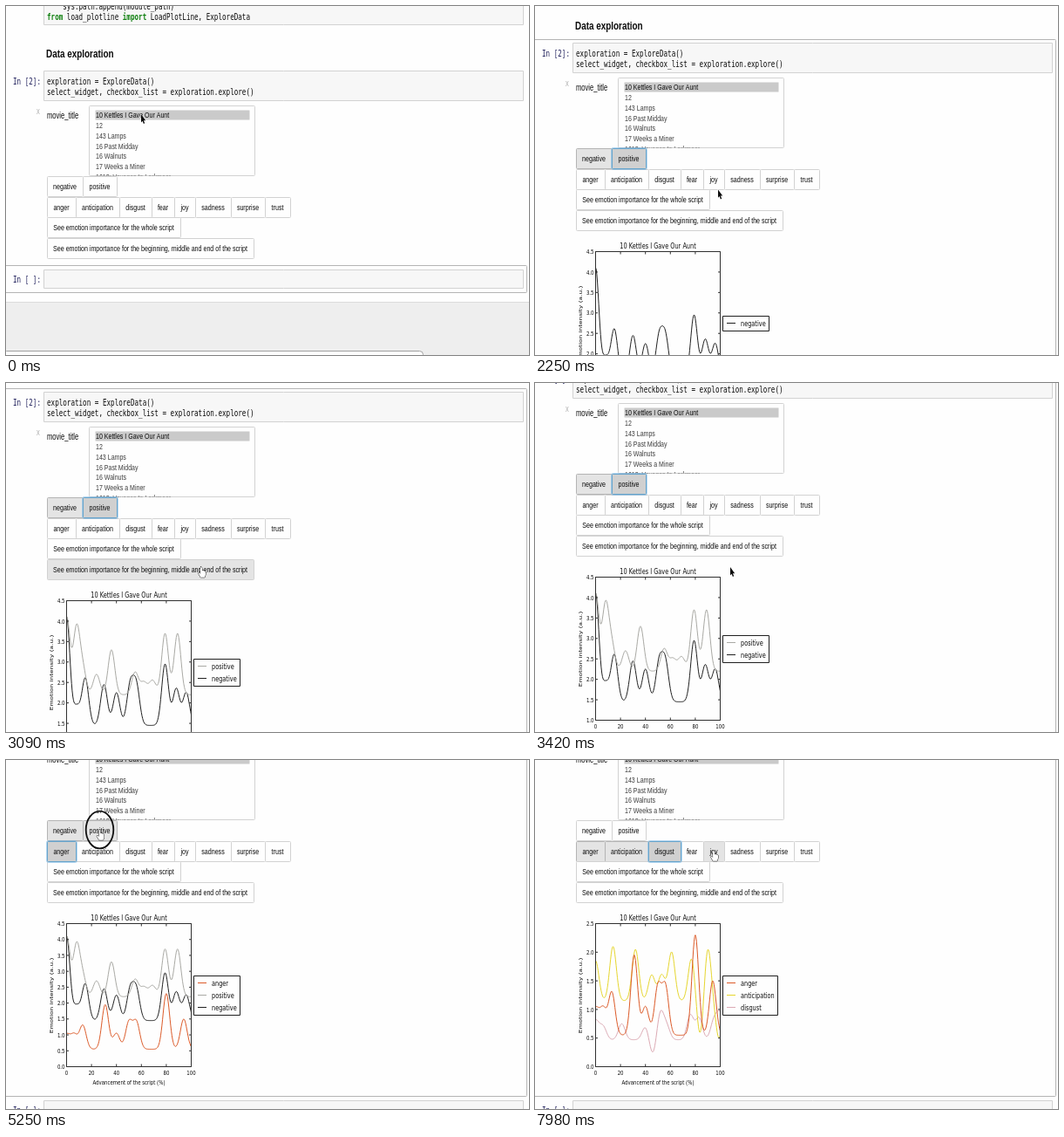
Animation, 600 px wide and 400 px high, one loop 8000 ms. Source, as an HTML page with a canvas:

```html
<!DOCTYPE html>
<html lang="en">
<head>
<meta charset="utf-8">
<title>Data exploration</title>
<style>
html, body { margin: 0; width: 100%; height: 100%; overflow: hidden; background: #fefefe; }
canvas { display: block; width: 600px; height: 400px; }
</style>
</head>
<body>
<canvas id="stage"></canvas>
<script>
const LOOP = 8000;
const LAG = 680; // the chart follows the buttons this much later
const ZOOM_X = 0.542, ZOOM_Y = 0.735; // the notebook page is shown squeezed
const SANS = '"Liberation Sans", Arial, sans-serif';
const MONO = '"DejaVu Sans Mono", monospace';
const PLOT = '"DejaVu Sans", sans-serif';
const PAGE = '#fefefe', INPUT = '#f7f7f7', FOOT = '#eeeeee';
const LINE = '#d2d2d2', CELL_LINE = '#b4b4b4', INK = '#0c0c0c';
const CHART_HEIGHT = 214;

const canvas = document.getElementById('stage');
const ratio = window.devicePixelRatio || 1;
canvas.width = 600 * ratio;
canvas.height = 400 * ratio;
const ctx = canvas.getContext('2d');

const MOVIE = '10 Kettles I Gave Our Aunt';
const OPTIONS = [MOVIE, '12', '143 Lamps', '16 Past Midday', '16 Walnuts',
  '17 Weeks a Miner', '1618: Voyages to Larkmoor'];

const BUTTON_SIZE = 13.1;
const BUTTONS = [
  ['negative', 'positive'],
  ['anger', 'anticipation', 'disgust', 'fear', 'joy', 'sadness', 'surprise', 'trust'],
  ['See emotion importance for the whole script'],
  ['See emotion importance for the beginning, middle and end of the script']
].flatMap((names, row) => {
  let right = 47;
  const top = Math.floor(195.5 + 23.5 * row);
  return names.map(name => {
    const left = right;
    right += textWidth(name, BUTTON_SIZE) + 14.4;
    return { name, left: Math.round(left), right: Math.round(right), top, bottom: top + 23 };
  });
});
const buttonNamed = name => BUTTONS.find(b => b.name === name);

// Each curve is a floor plus equal bell shapes; peaks hold [advancement, intensity]
const CURVES = {
  anger: { color: '#dc5a28', floor: .55,
    peaks: [[0, 1], [6, 1], [13, 1.3], [31, 1.95], [40, 1.05], [50, 1.4], [56, 1.4], [80, 2.3], [94, 1.5]] },
  anticipation: { color: '#e6d62e', floor: 1.15,
    peaks: [[0, 1.85], [14, 2.1], [32, 2.05], [45, 1.6], [53, 1.6], [61, 2], [77, 1.9], [84, .5], [90, 2.1], [99, .5]] },
  disgust: { color: '#dcaab4', floor: .47,
    peaks: [[0, .8], [6, .7], [21, .75], [40, .7], [46, .2], [52, .95], [57, .7], [76, .9], [83, .85], [95, .8], [100, .9]] },
  positive: { color: '#a9a9a4', floor: 2.2,
    peaks: [[0, 4.1], [8, 3.8], [13, 2.8], [24, 2.7], [36, 3.3], [55, 2.75], [62, 2.5], [69, 2.55], [79, 3.7], [89, 3.7]] },
  negative: { color: '#202020', floor: 1.45,
    peaks: [[0, 4.1], [8, 1.9], [15, 2.6], [30, 2.45], [40, 2.25], [51, 2.4], [56, 2.4], [79, 2.95], [88, 2.35], [96, 2.25]] }
};
const intensity = ({ floor, peaks }, x) =>
  peaks.reduce((sum, [at, height]) => sum + (height - floor) * Math.exp(-(((x - at) / 3.8) ** 2)), floor);

// Pointer journeys: leave, arrive, goal, click
const STEPS = [
  [660, 1020, 'negative', 1110],
  [1200, 1440, 'positive', 1900],
  [1960, 2330, [224, 211]],
  [3780, 4000, 'positive'],
  [4060, 4290, 'anger', 4350],
  [4860, 5220, 'positive', 5290],
  [5730, 5980, 'negative', 6120],
  [6540, 6690, 'anticipation', 6750],
  [6930, 7170, 'disgust', 7260],
  [7620, 7920, 'joy']
];
const CLICKS = STEPS.filter(step => step[3]).map(([, , name, at]) => ({ name, at }));
const SCROLL = [[0, 0], [1980, 0], [2430, 54], [2970, 54], [3420, 91], [3840, 126]];

const smooth = u => u * u * (3 - 2 * u);
const isOn = (name, t) => CLICKS.filter(c => c.name === name && c.at <= t).length % 2 === 1;

function scrollAt(t) {
  const next = SCROLL.findIndex(([at]) => at > t);
  if (next < 0) return SCROLL.at(-1)[1];
  const [t0, y0] = SCROLL[next - 1], [t1, y1] = SCROLL[next];
  return Math.round(y0 + (y1 - y0) * (t - t0) / (t1 - t0));
}

function goalPoint(goal, t) {
  if (Array.isArray(goal)) return goal;
  const b = buttonNamed(goal);
  return [(b.left + b.right) / 2, b.top + 11 - scrollAt(t)];
}

function mouseAt(t) {
  let [x, y] = [155, 124];
  for (const [leave, arrive, goal] of STEPS) {
    if (t <= leave) break;
    const u = smooth(Math.min(1, (t - leave) / (arrive - leave)));
    const [gx, gy] = goalPoint(goal, arrive);
    x += (gx - x) * u;
    y += (gy - y) * u;
  }
  return [x, y];
}

function textWidth(str, size, font = SANS) {
  ctx.font = `${size}px ${font}`;
  return ctx.measureText(str).width * ZOOM_X;
}

// y is the middle of the capitals
function text(str, x, y, size, { font = SANS, align = 'left', color = INK, weight = '', turn = 0 } = {}) {
  ctx.save();
  ctx.translate(x, y);
  ctx.scale(ZOOM_X, ZOOM_Y);
  ctx.rotate(turn);
  ctx.font = `${weight} ${size}px ${font}`;
  ctx.textAlign = align;
  ctx.fillStyle = color;
  ctx.fillText(str, 0, size * 0.36);
  const width = ctx.measureText(str).width * ZOOM_X;
  ctx.restore();
  return x + width;
}

function box(left, top, right, bottom, fill, stroke, radius = 0) {
  ctx.beginPath();
  ctx.roundRect(left + .5, top + .5, right - left - 1, bottom - top - 1, radius);
  if (fill) { ctx.fillStyle = fill; ctx.fill(); }
  if (stroke) { ctx.strokeStyle = stroke; ctx.lineWidth = 1; ctx.stroke(); }
}

function code(str, y, x = 47) {
  for (const part of str.split(/(\bfrom\b|\bimport\b)/)) {
    const key = part === 'from' || part === 'import';
    x = text(part, x, y, 14, { font: MONO, color: key ? '#108010' : INK, weight: key ? 'bold' : '' });
  }
}

const prompt = (str, y) => text(str, 8, y, 14, { font: MONO, color: '#20205c' });

function drawWidgets(t, hovered) {
  text('x', 35, 120, 14, { color: '#b0b0b0' });
  text('movie_title', 47, 125, 14);
  box(95, 114, 286, 195, PAGE, LINE, 1);
  ctx.save();
  ctx.beginPath();
  ctx.rect(96, 115, 189, 79.5);
  ctx.clip();
  box(102, 119, 280, 131, '#cacaca');
  OPTIONS.forEach((name, i) => text(name, 103, 125 + i * 11.7, 13, { color: i ? '#3c3c3c' : INK }));
  ctx.restore();

  const focus = CLICKS.findLast(c => c.at <= t)?.name;
  for (const b of BUTTONS) {
    const on = isOn(b.name, t);
    const fill = on && b.name === focus ? '#d0d0d0' : on || b === hovered ? '#e4e4e4' : PAGE;
    box(b.left, b.top, b.right + 1, b.bottom + 1, fill, on ? '#b4b4b4' : LINE, 1);
    text(b.name, (b.left + b.right) / 2, b.top + 11.5, BUTTON_SIZE, { align: 'center' });
  }
  if (focus) {
    const { left, top, right, bottom } = buttonNamed(focus);
    box(left - 1, top - 1, right + 2, bottom + 2, null, 'rgba(110,175,225,.5)', 2);
    box(left, top, right + 1, bottom + 1, null, '#66a4cc', 1);
  }
}

function drawCurve(curve, px, py) {
  ctx.beginPath();
  for (let x = 0; x <= 100; x += .5) ctx.lineTo(px(x), py(intensity(curve, x)));
  ctx.strokeStyle = curve.color;
  ctx.lineWidth = 1;
  ctx.stroke();
}

function drawChart(names) {
  const left = 69.5, right = 212.5, top = 313.5, bottom = 477.5;
  const isTone = name => name === 'positive' || name === 'negative';
  const low = names.every(isTone) ? 1 : 0;
  const high = names.some(isTone) ? 4.5 : 2.5;
  const px = x => left + (right - left) * x / 100;
  const py = v => bottom - (bottom - top) * (v - low) / (high - low);
  const font = PLOT;
  text(MOVIE, 141, 307, 12.1, { font, align: 'center' });
  text('Advancement of the script (%)', 141, 495, 10, { font, align: 'center' });
  text('Emotion intensity (a.u.)', 52.5, 396, 10, { font, align: 'center', turn: -Math.PI / 2 });

  for (const name of [...names].reverse()) drawCurve(CURVES[name], px, py);

  ctx.beginPath();
  ctx.rect(left, top, right - left, bottom - top);
  for (let x = 0; x <= 100; x += 20) {
    ctx.moveTo(px(x), bottom); ctx.lineTo(px(x), bottom - 3);
    ctx.moveTo(px(x), top); ctx.lineTo(px(x), top + 3);
    text(String(x), px(x), 484, 10, { font, align: 'center' });
  }
  for (let v = low; v <= high; v += .5) {
    ctx.moveTo(left, py(v)); ctx.lineTo(left + 2.5, py(v));
    ctx.moveTo(right, py(v)); ctx.lineTo(right - 2.5, py(v));
    text(v.toFixed(1), 67.5, py(v), 10, { font, align: 'right' });
  }
  ctx.strokeStyle = '#303030';
  ctx.lineWidth = 1;
  ctx.stroke();
  drawLegend(names, font);
}

function drawLegend(names, font) {
  const half = 8.5 + 7 * (names.length - 1);
  const widest = Math.max(...['negative', ...names].map(name => textWidth(name, 12.1, font)));
  box(215, Math.round(395 - half), Math.round(240 + widest), Math.round(396 + half), PAGE, '#202020');
  names.forEach((name, i) => {
    const y = 395.5 + 14 * (i - (names.length - 1) / 2);
    ctx.fillStyle = CURVES[name].color;
    ctx.fillRect(220, Math.floor(y), 10, 1);
    text(name, 236, y, 12.1, { font });
  });
}

function drawPage(t, scroll, hovered) {
  const names = Object.keys(CURVES).filter(name => isOn(name, t - LAG));
  const shift = names.length ? CHART_HEIGHT : 0;
  ctx.save();
  ctx.translate(0, -scroll);

  box(43, -30, 594, 22, INPUT, LINE);
  code('    sys.path.append(module_path)', .5);
  code('from load_plotline import LoadPlotLine, ExploreData', 12.5);
  text('Data exploration', 46, 54.5, 18.3, { weight: 'bold' });

  if (t >= CLICKS[0].at) box(-2, 70, 598, 298 + shift, null, CELL_LINE, 1);
  else box(-2, 297, 598, 329, null, CELL_LINE, 1);

  prompt('In [2]:', 86);
  box(43, 74, 594, 109, INPUT, LINE);
  code('exploration = ExploreData()', 86);
  code('select_widget, checkbox_list = exploration.explore()', 98.5);
  drawWidgets(t, hovered);
  if (names.length) drawChart(names);

  prompt('In [ ]:', 313.5 + shift);
  box(43, 302 + shift, 594, 324 + shift, INPUT, LINE);
  ctx.fillStyle = FOOT;
  ctx.fillRect(0, 340 + shift, 600, 400);
  ctx.fillStyle = '#dcdcdc';
  ctx.fillRect(0, 339 + shift, 600, 1);
  ctx.restore();
}

const ARROW = new Path2D('M0 0V9.4L1.6 7.7 2.9 11 4.2 10.3 2.9 7.2H5.2Z');
const HAND = new Path2D('M-.9 .6Q0-.6 .9 .6V4.2L2.2 3.9 3.2 4.5 4.2 4.4 5 5.4V8.4L4 11.8H-.8L-3.2 7.4Q-3.3 6-2 6.6L-.9 8Z');

function drawMouse(t, x, y, hand) {
  ctx.save();
  ctx.translate(x, y);
  ctx.lineJoin = 'round';
  ctx.lineWidth = 1;
  ctx.fillStyle = hand ? '#fefefe' : '#0c0c0c';
  ctx.strokeStyle = hand ? '#141414' : '#fefefe';
  const shape = hand ? HAND : ARROW;
  ctx.stroke(shape);
  ctx.fill(shape);
  ctx.restore();
  if (CLICKS.some(({ at }) => t >= at - 60 && t < at + 90)) {
    ctx.beginPath();
    ctx.ellipse(x, y, 15.8, 21.4, 0, 0, Math.PI * 2);
    ctx.strokeStyle = '#101010';
    ctx.lineWidth = 1.8;
    ctx.stroke();
  }
}

function draw(t) {
  ctx.setTransform(ratio, 0, 0, ratio, 0, 0);
  ctx.fillStyle = PAGE;
  ctx.fillRect(0, 0, 600, 400);
  const scroll = scrollAt(t);
  const [x, y] = mouseAt(t);
  const hovered = BUTTONS.find(b => x >= b.left && x < b.right &&
    y + scroll >= b.top && y + scroll < b.bottom);
  drawPage(t, scroll, hovered);
  if (t < 60) box(-4, 395, 479, 410, PAGE, '#a0a0a0', 4);
  drawMouse(t, x, y, hovered);
}

let start;
function tick(now) {
  start ??= now;
  draw((now - start) % LOOP);
  requestAnimationFrame(tick);
}
draw(0);
requestAnimationFrame(tick);
</script>
</body>
</html>
```
